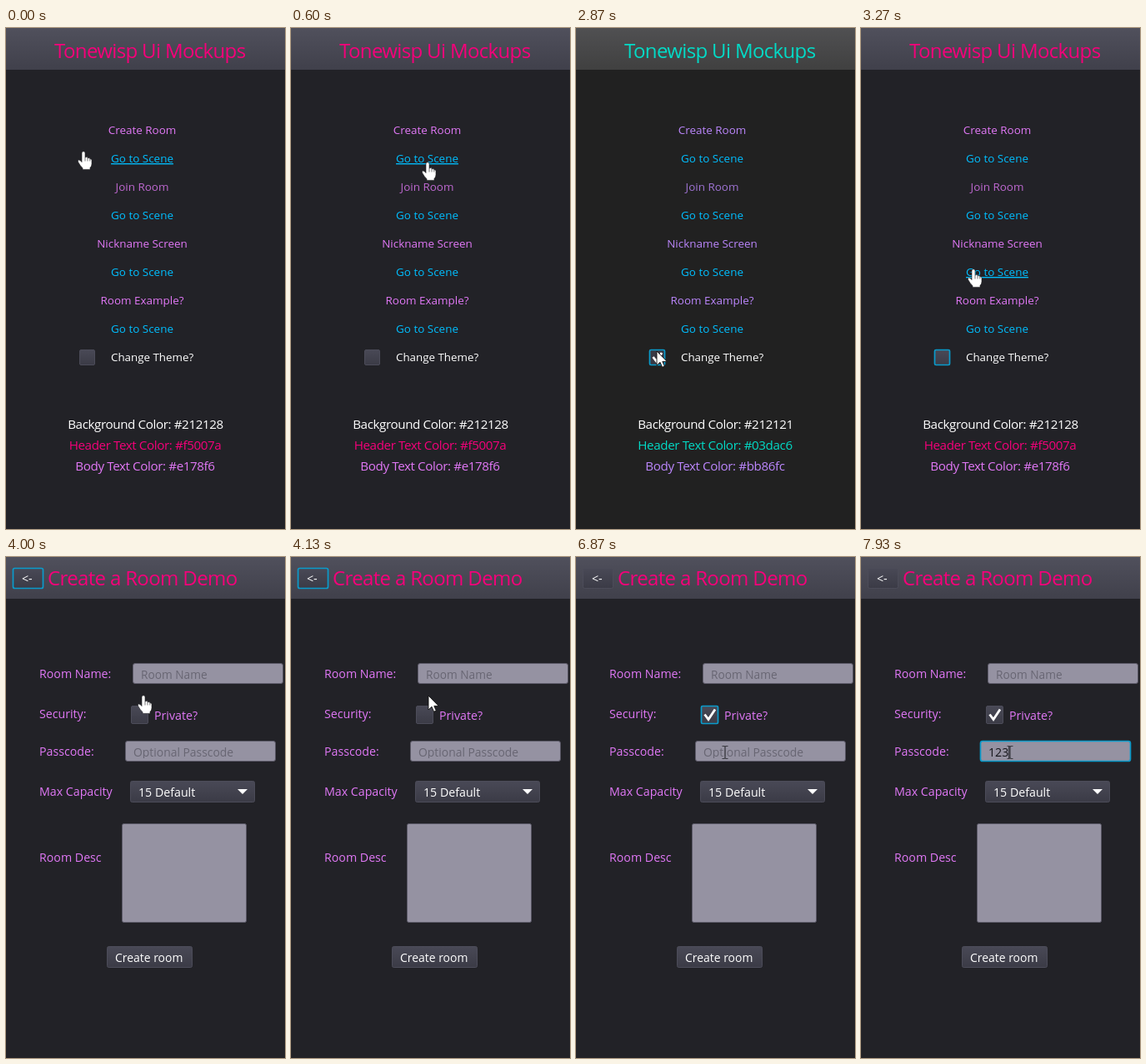
Recreate the animation shown at these times as an HTML page. Size 335 by 600 pixels, loop 8000 ms.

```html
<!DOCTYPE html>
<html lang="en">
<head>
<meta charset="utf-8">
<title>Ui Mockups</title>
<style>
  html, body { margin: 0; width: 100%; height: 100%; overflow: hidden; background: #222227; }
  svg { display: block; width: 100%; height: 100%; }
  text { font-family: "Open Sans", "Noto Sans", sans-serif; font-size: 14.2px; white-space: pre; }
  .title { font-size: 24px; letter-spacing: -.65px; fill: var(--head); }
  #stage { --head: #f5007a; --body: #e178f6; --back: #222227; --top: #50505c; --bottom: #40404b; }
  #stage.alt { --head: #03dac6; --body: #bb86fc; --back: #212121; --top: #505052; --bottom: #404040; }
  .list text { font-size: 13.45px; text-anchor: middle; }
  .label { fill: var(--body); }
  .label.dim { opacity: .82; }
  .list .link { fill: #00bfff; }
  .link.hover { text-decoration: underline 1px; text-underline-offset: 1px; }
  .codes text { font-size: 15.2px; letter-spacing: -.4px; text-anchor: middle; }
  .form text { fill: var(--body); }
  .white, .form .white { fill: #fff; }
  .form .prompt { fill: #686673; }
  .form .typed { fill: #15151a; }
  .button { fill: url(#control); stroke: #4c4c59; }
  .button.hover { fill: url(#controlHover); }
  .button.down { fill: #393944; }
  .field { fill: #9592a2; stroke: #5d5b69; }
  .button.focus, .field.focus { stroke: #0a9bcb; stroke-width: 1.7; }
  .tick { fill: none; stroke: #fff; stroke-width: 2.8; }
</style>
</head>
<body>
<svg id="stage" viewBox="0 0 335 600" preserveAspectRatio="none">
  <defs>
    <linearGradient id="bar" x2="0" y2="1">
      <stop stop-color="var(--top)"/><stop offset="1" stop-color="var(--bottom)"/>
    </linearGradient>
    <linearGradient id="control" x2="0" y2="1">
      <stop stop-color="#494956"/><stop offset="1" stop-color="#3b3b46"/>
    </linearGradient>
    <linearGradient id="controlHover" x2="0" y2="1">
      <stop stop-color="#626272"/><stop offset="1" stop-color="#50505e"/>
    </linearGradient>
    <clipPath id="promptClip"><path d="M143 220h181v21H143z"/></clipPath>
  </defs>

  <path fill="var(--back)" d="M0 0h335v600H0z"/>
  <path fill="url(#bar)" d="M0 0h335v50H0z"/>

  <g id="menu">
    <text class="title" x="58" y="36">Tonewisp Ui Mockups</text>
    <g class="list" id="list"></g>
    <rect class="button" id="themeBox" x="88.5" y="385.5" width="18" height="18" rx="1.5"/>
    <path class="tick" id="themeTick" d="M92.5 394l4 5 6.5-10"/>
    <text class="white" x="126" y="399" style="font-size:13.35px">Change Theme?</text>
    <g class="codes">
      <text class="white" id="backCode" x="167.5" y="480"></text>
      <text id="headCode" x="167" y="505" fill="var(--head)"></text>
      <text id="bodyCode" x="167" y="530" fill="var(--body)"></text>
    </g>
  </g>

  <g id="room">
    <rect class="button" id="back" x="8.5" y="13.5" width="36" height="24" rx="2"/>
    <text class="white" x="19" y="31">&lt;-</text>
    <text class="title" x="50" y="34">Create a Room Demo</text>
    <g class="form">
      <text x="40" y="145">Room Name:</text>
      <text x="40" y="193">Security:</text>
      <text x="40" y="238">Passcode:</text>
      <text x="40" y="286">Max Capacity</text>
      <text x="40" y="365">Room Desc</text>
      <rect class="field" x="152.5" y="127.5" width="180" height="24" rx="2.5"/>
      <text class="prompt" x="162" y="146" style="font-size:13.7px">Room Name</text>
      <rect class="button" id="privateBox" x="150.5" y="178.5" width="20" height="21" rx="1.5"/>
      <path class="tick" id="privateTick" d="M154.5 188.5l4.5 6 8-12"/>
      <text x="178" y="195">Private?</text>
      <rect class="field" id="passField" x="143.5" y="220.5" width="180" height="24" rx="2.5"/>
      <text class="prompt" id="passPrompt" x="153" y="239" clip-path="url(#promptClip)" style="font-size:13.9px">Optional Passcode</text>
      <text class="typed" id="passText" x="153" y="239"></text>
      <path id="caret" stroke="#15151a" d="M0 226v15"/>
      <rect class="button" x="149.5" y="268.5" width="149" height="25" rx="2"/>
      <text class="white" x="159" y="287">15 Default</text>
      <path fill="#fff" d="M278 278h12l-6 6z"/>
      <rect class="field" x="139.5" y="319.5" width="149" height="118" rx="2"/>
      <rect class="button" x="121.5" y="466.5" width="102" height="25" rx="2"/>
      <text class="white" x="131" y="485" style="font-size:13.95px">Create room</text>
    </g>
  </g>

  <g id="cursor">
    <path id="arrow" fill="#fff" stroke="#111" stroke-width=".9" d="M0 0v17l4-3.7 2.6 6 2.7-1.2-2.5-5.7h5.4z"/>
    <g id="hand" stroke="#1a1a1e" stroke-width=".6">
      <path fill="#fff" d="M-2 1.8a2 2 0 0 1 4 0V7q2.6-1.6 3 .8 2.4-1 2.8 1 2.2-.6 2.2 1.6v4.4q0 3-2 4.6v2h-9v-1.6q-3-3-5.4-7.4-.6-2 .8-2.4 2 0 3.6 2.6z"/>
      <path d="M2 7v4.5M5 8v3.5M7.8 9v2.5"/>
    </g>
    <path id="beam" fill="none" stroke="#3b3b42" stroke-width="1.2" d="M-3.5-7.5h2.5l1 1 1-1h2.5M0-6.5v13M-3.5 7.5h2.5l1-1 1 1h2.5"/>
  </g>
</svg>
<script>
const LOOP = 8000, TICK = 200 / 3;
const $ = id => document.getElementById(id);

// Pointer path: time, x, y
const path = [
  [0, 93, 148], [200, 116, 130], [333, 145, 124], [467, 163, 148], [600, 164, 161],
  [667, 166, 190], [867, 164, 433], [1000, 187, 465], [1133, 152, 473], [1333, 87, 418],
  [1467, 90, 416], [1600, 94, 402], [1667, 94, 402], [1867, 96, 388], [2800, 96, 388],
  [2867, 97, 387], [3067, 97, 387], [3267, 135, 289], [3600, 165, 173], [3733, 165, 173],
  [3800, 165, 168], [3933, 165, 168], [4000, 165, 166], [4533, 165, 166], [4733, 167, 146],
  [5267, 167, 146], [5400, 181, 178], [5533, 194, 219], [5733, 164, 200], [6133, 164, 200],
  [6400, 181, 252], [6667, 181, 252], [6733, 198, 240], [6867, 179, 234], [8000, 179, 234]
];

const names = ["Create Room", "Join Room", "Nickname Screen", "Room Example?"];
const links = names.map((name, i) => {
  const y = 127 + 68 * i;
  addText(name, name === "Join Room" ? "label dim" : "label", y);
  return addText("Go to Scene", "link", y + 34);
});

function addText(content, className, y) {
  const el = document.createElementNS("http://www.w3.org/2000/svg", "text");
  el.textContent = content;
  el.setAttribute("class", className);
  el.setAttribute("x", 163.5);
  el.setAttribute("y", y);
  return $("list").appendChild(el);
}

function pointerAt(t) {
  const i = Math.max(1, path.findIndex(p => p[0] >= t));
  const [t0, x0, y0] = path[i - 1], [t1, x1, y1] = path[i];
  const k = (t - t0) / (t1 - t0);
  return [Math.round(x0 + (x1 - x0) * k), Math.round(y0 + (y1 - y0) * k)];
}

const show = (id, on) => $(id).style.display = on ? "" : "none";
const flag = (el, name, on) => el.classList.toggle(name, on);
const between = (v, a, b) => v >= a && v < b;

function draw(t) {
  const [x, y] = pointerAt(Math.floor(t / TICK + 0.05) * TICK);
  const inside = (l, top, r, b) => between(x, l, r) && between(y, top, b);
  const onMenu = t < 4000, alt = between(t, 2130, 3070);
  show("menu", onMenu);
  show("room", !onMenu);

  // The hand lingers briefly after the scene switches
  let overLink = between(t, 4000, 4130);
  links.forEach((link, i) => {
    const top = 147 + 68 * i;
    const over = onMenu && inside(86, top, 240, top + 27);
    flag(link, "hover", over);
    overLink ||= over;
  });

  flag($("stage"), "alt", alt);
  $("backCode").textContent = "Background Color: " + (alt ? "#212121" : "#212128");
  $("headCode").textContent = "Header Text Color: " + (alt ? "#03dac6" : "#f5007a");
  $("bodyCode").textContent = "Body Text Color: " + (alt ? "#bb86fc" : "#e178f6");
  show("themeTick", alt);
  flag($("themeBox"), "focus", t >= 1930);
  flag($("themeBox"), "hover", inside(88, 385, 108, 405));
  flag($("themeBox"), "down", between(t, 1930, 2130) || between(t, 2870, 3070));

  const passFocus = t >= 7070;
  flag($("back"), "focus", t < 5870);
  flag($("privateBox"), "focus", between(t, 5870, 7070));
  flag($("privateBox"), "hover", inside(150, 178, 172, 201));
  flag($("privateBox"), "down", between(t, 5870, 6000));
  show("privateTick", t >= 6000);
  flag($("passField"), "focus", passFocus);
  show("passPrompt", !passFocus);
  const typed = [7600, 7730, 7930].filter(at => t >= at).length;
  $("passText").textContent = "123".slice(0, typed);
  show("caret", passFocus);
  $("caret").setAttribute("transform", `translate(${153.5 + 8.1 * typed})`);

  const overField = !onMenu && (inside(152, 127, 333, 152) || inside(143, 220, 324, 245));
  show("hand", overLink);
  show("beam", overField);
  show("arrow", !overLink && !overField);
  $("cursor").setAttribute("transform", `translate(${x} ${y})`);
}

function frame() {
  draw(performance.now() % LOOP);
  requestAnimationFrame(frame);
}
frame();
</script>
</body>
</html>
```
